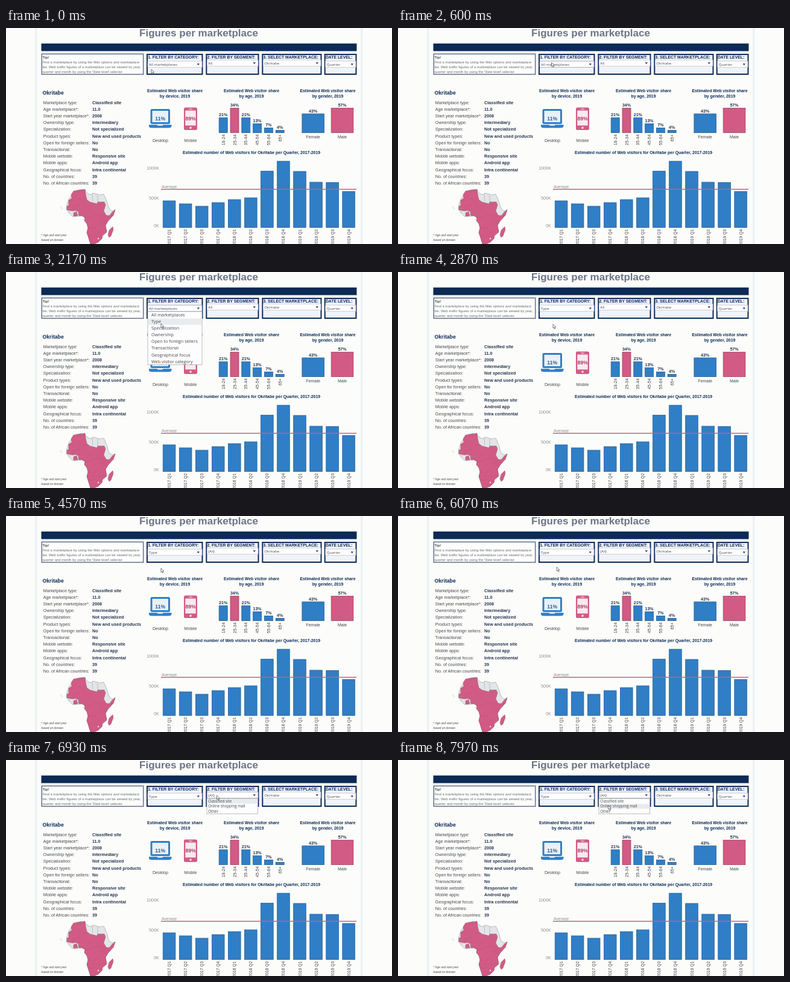
An HTML page that plays this animation: 640x360 px, repeating every 8000 ms.

```html
<!DOCTYPE html>
<html lang="en">
<head>
<meta charset="utf-8">
<title>Figures per marketplace</title>
<style>
  html, body { margin: 0; width: 100%; height: 100%; overflow: hidden; background: #fcfdfa; }
  svg { display: block; width: 100vw; height: 100vh; font-family: "Liberation Sans", Arial, sans-serif; }
  .control { font-family: "Open Sans", "Noto Sans", sans-serif; }
</style>
</head>
<body>
<svg id="stage" viewBox="0 0 640 360"></svg>
<script>
const LOOP = 8000;
const NAVY = '#0b2a55', BLUE = '#307ec6', PINK = '#d15b84', GREY = '#8b8d92', INK = '#45474e';
const NAME = 'Okritabe';
const stage = document.getElementById('stage');
let parent = stage;

function add(tag, attrs) {
  const node = document.createElementNS('http://www.w3.org/2000/svg', tag);
  for (const key in attrs) node.setAttribute(key, attrs[key]);
  return parent.appendChild(node);
}
function rect(x, y, width, height, fill, extra) {
  return add('rect', { x, y, width, height, fill, ...extra });
}
function frame(x, y, width, height, stroke, line, fill = 'none') {
  return rect(x, y, width, height, fill, { stroke, 'stroke-width': line });
}
function text(string, x, y, size, fill, extra) {
  const node = add('text', { x, y, 'font-size': size, fill, ...extra });
  node.textContent = string;
  return node;
}
function bold(string, x, y, size, fill = NAVY, anchor = 'start') {
  return text(string, x, y, size, fill, { 'font-weight': 700, 'text-anchor': anchor });
}
function centered(string, x, y, size, fill = INK) {
  return text(string, x, y, size, fill, { 'text-anchor': 'middle' });
}
function vertical(string, x, y, size) {
  text(string, 0, 0, size, INK, { 'text-anchor': 'end', transform: `translate(${x} ${y}) rotate(-90)` });
}
function path(d, fill, stroke = 'none', line = 0.6) {
  return add('path', { d, fill, stroke, 'stroke-width': line, 'stroke-linejoin': 'round' });
}
function bar(x, top, width, base, fill = BLUE) {
  frame(x, top, width, base - top, fill === BLUE ? '#285f96' : '#9c4565', 0.8, fill);
}
function group() {
  parent = stage;
  return parent = add('g', {});
}

function drawHeader() {
  rect(48, 0, 3.5, 360, '#edf0f6');
  rect(588, 0, 3.5, 360, '#edf0f6');
  bold('Figures per marketplace', 319.5, 14.3, 17.05, '#6c7487', 'middle');
  rect(58.5, 25.8, 523, 12.7, NAVY);
  frame(59.3, 43.3, 168.4, 34, '#63708b', 1.5, '#fdfefc');
  bold('Tip!', 60.5, 51.2, 5.9, INK);
  ['Find a marketplace by using the filter options and marketplace',
   'list. Web traffic figures of a marketplace can be viewed by year,',
   'quarter and month by using the \'Date level\' selector']
    .forEach((line, i) => text(line, 60.5, 59.4 + i * 7.6, 5.85, '#666970'));
}

// Draws one filter panel and returns its value and select box.
function filter(label, x, right, selectY, value) {
  frame(x + 1, 44, right - x - 2, 33, NAVY, 2, '#f0f3f8');
  bold(label, x + 2.2, 51.2, 6.85);
  const box = frame(x + 2, selectY, right - x - 3.5, 10.3, '#c3c6cb', 0.8, '#fff');
  path(`M${right - 10} ${selectY + 4}h4.6l-2.3 3.2z`, '#3e4f70');
  return { box, value: text(value, x + 4, selectY + 7.6, 6.15, INK, { class: 'control' }) };
}

function drawDetails() {
  bold(NAME, 60.5, 110.5, 8.7);
  [['Marketplace type:', 'Classified site'], ['Age marketplace*:', '11.0'],
   ['Start year marketplace*:', '2008'], ['Ownership type:', 'Intermediary'],
   ['Specialization:', 'Not specialized'], ['Product types:', 'New and used products'],
   ['Open for foreign sellers:', 'No'], ['Transactional:', 'No'],
   ['Mobile website:', 'Responsive site'], ['Mobile apps:', 'Android app'],
   ['Geographical focus:', 'Intra continental'], ['No. of countries:', '39'],
   ['No. of African countries:', '39']].forEach(([label, value], i) => {
    const y = 126.6 + i * 11.2;
    text(label, 61.8, y, 7.2, INK);
    bold(value, 143, y, 7.2, '#26334f');
  });
  ['* Age and start year', 'based on domain'].forEach((line, i) =>
    text(line, 58.5, 347.4 + i * 8, 4.75, INK, { 'font-style': 'italic' }));
}

function drawMap() {
  const edge = '#96979f', border = '#86566a';
  path('M112 272L121 270L131 269L133 274L140 278L145 275L155 278L162 277L164 281L168 291L170 299L175 305L181 303L178 312L169 322L165 329L167 340L160 346L159 351L153 357L146 360L140 360L137 350L134 341L136 333L134 326L130 321L131 316L126 313L118 314L110 314L105 309L100 302L101 294L104 285L109 278Z', '#e4e5e8', edge);
  path('M112 272L121 270L131 269L132 277L134 286L139 290L151 293L152 290L163 290L165 295L162 305L166 312L171 313L176 307L181 303L178 312L169 322L165 329L167 340L160 346L159 351L153 357L146 360L140 360L137 350L134 341L136 333L134 326L130 321L131 316L126 313L121 313L120 306L115 304L111 305L105 304L101 303L101 297L104 296L104 287L109 284L108 278Z', PINK, border, 0.5);
  path('M112 314L112 308L117 306L119 313Z', PINK, border, 0.4);
  path('M177 331L178 336L174 347L171 349L169 345L171 337Z', PINK, border, 0.4);
  path('M143 276L144 289M152 278V290M163 290L152 290M102 300L109 301M104 308L108 304M120 306L119 313', 'none', edge, 0.5);
  path('M111 305L112 297L122 296M119 282L133 294M104 287L112 287M133 303L140 304L141 309M165 312L162 319L166 326M131 316L141 315L146 311L161 312L158 326L165 331M136 333L147 334L153 327M138 347L146 347L153 341L160 339', 'none', '#b84d74', 0.35);
  add('circle', { cx: 153, cy: 351, r: 1.2, fill: '#e4e5e8' });
  path('M90 298l2 1M92 301l1.5-.5', 'none', edge);
}

function drawTitle(x, topic) {
  bold('Estimated Web visitor share', x, 107.3, 6.9, NAVY, 'middle');
  bold(`by ${topic}, 2019`, x, 116, 6.9, NAVY, 'middle');
}

function drawDevices() {
  drawTitle(280, 'device');
  rect(239.5, 135, 32.5, 25, BLUE, { rx: 2.5 });
  rect(242.5, 138, 26.5, 19, '#e9f1f8');
  path('M237 161.2H274.5V163.5Q274 166.5 270 166.5H241.5Q237 166.5 237 163.5Z', BLUE);
  rect(251, 161.2, 9, 1.6, '#e9f1f8');
  rect(295, 132.5, 22, 37.5, PINK, { rx: 2.5 });
  rect(297.3, 137.5, 17.4, 25, '#f8eaf0');
  rect(303, 134.6, 6, 1, '#f8eaf0');
  add('circle', { cx: 306, cy: 166.3, r: 1.7, fill: '#f8eaf0' });
  bold('11%', 255.7, 154.3, 8.6, '#285f9e', 'middle');
  bold('89%', 306, 154.3, 8.6, '#a34464', 'middle');
  centered('Desktop', 256, 190, 7.1);
  centered('Mobile', 306, 190, 7.1);
}

function drawShares() {
  drawTitle(407, 'age');
  [['18-24', 21, 149.5], ['25-34', 34, 133.5], ['35-44', 21, 149.5],
   ['45-54', 13, 159.5], ['55-64', 7, 166.5], ['65+', 4, 170.5]].forEach(([age, share, top], i) => {
    const x = 353.2 + i * 18.8;
    bar(x, top, 14, 174.5, share === 34 ? PINK : BLUE);
    bold(share + '%', x + 7, top - 2.4, 7.1, '#26334f', 'middle');
    vertical(age, x + 9.5, 177.3, 7.1);
  });
  drawTitle(533.5, 'gender');
  [['Female', 43, 143, BLUE], ['Male', 57, 133.5, PINK]].forEach(([sex, share, top, fill], i) => {
    const x = 490.9 + i * 48.3;
    bar(x, top, 36.7, 174.5, fill);
    bold(share + '%', x + 18.3, top - 2.4, 7.1, '#26334f', 'middle');
    centered(sex, x + 18.3, 183.5, 7);
  });
}

function drawQuarters() {
  bold(`Estimated number of Web visitors for ${NAME} per Quarter, 2017-2019`, 407, 210.3, 6.9, NAVY, 'middle');
  [['1000K', 236.2], ['500K', 286.2], ['0K', 331.5]].forEach(([label, y]) =>
    text(label, 253.7, y, 7.2, GREY, { 'text-anchor': 'end' }));
  [288, 293, 297, 291, 286, 283, 238.5, 222, 239, 257, 257.5, 272.5].forEach((top, i) => {
    const x = 260.3 + i * 27.05;
    bar(x, top, 20.6, 332.5);
    vertical(`${2017 + Math.floor(i / 4)} Q${i % 4 + 1}`, x + 12.8, 335.5, 6.9);
  });
  rect(257, 268, 324, 1.5, PINK);
  text('Average', 258, 266.8, 6.8, GREY);
}

// An open list with a highlight bar that can be moved between rows.
function list(items, x, y, width, row, indent, size) {
  const node = group();
  frame(x, y, width, items.length * row, '#a9acb3', 0.8, '#fdfdfd');
  const highlight = rect(x + 0.8, y + 0.5, width - 1.6, row - 0.5, '#e9ebee');
  items.forEach((item, i) =>
    text(item, x + indent, y + (i + 0.5) * row + size * 0.37, size, INK, { class: 'control' }));
  return {
    show: on => node.setAttribute('visibility', on ? 'visible' : 'hidden'),
    select: i => highlight.setAttribute('y', y + 0.5 + i * row)
  };
}

drawHeader();
const category = filter('1. FILTER BY CATEGORY:', 233, 326.5, 55.2, 'All marketplaces');
const segment = filter('2. FILTER BY SEGMENT:', 331.3, 419.5, 53.2, 'All');
filter('3. SELECT MARKETPLACE:', 424.3, 523.5, 53.2, NAME);
filter('DATE LEVEL:', 527.7, 581.5, 55.2, 'Quarter');
drawDetails();
drawMap();
drawDevices();
drawShares();
drawQuarters();
const categoryList = list(['All marketplaces', 'Type', 'Specialization', 'Ownership',
  'Open to foreign sellers', 'Transactional', 'Geographical focus', 'Web visitor category'],
  235, 66, 90, 11.05, 6, 7.25);
const segmentList = list(['Classified site', 'Online shopping mall', 'Other'], 333, 64.3, 84.5, 8.5, 2.2, 6.2);
const cursor = group();
path('M0 0V6.6L1.6 5.2L2.8 7.8L3.9 7.3L2.8 4.8H4.8Z', '#fff', '#41444c', 0.7);

// Pointer stops: time, x, y
const route = [[0, 241, 69], [400, 241, 69], [600, 254.5, 57.5], [1740, 254.5, 57.5], [2170, 257, 86],
  [2870, 257, 87], [6035, 257, 87], [6070, 263, 85], [6600, 349.5, 59], [7240, 349.5, 59],
  [7430, 349, 70.5], [7640, 349, 70.5], [7970, 348.7, 76], [LOOP, 348.7, 76]];

function pointerAt(t) {
  const i = route.findIndex(stop => stop[0] > t);
  const [t0, x0, y0] = route[i - 1], [t1, x1, y1] = route[i];
  const k = (t - t0) / (t1 - t0);
  return [x0 + (x1 - x0) * k, y0 + (y1 - y0) * k];
}

function render(t) {
  const [x, y] = pointerAt(t);
  cursor.setAttribute('transform', `translate(${x} ${y})`);
  category.value.textContent = t < 2700 ? 'All marketplaces' : 'Type';
  segment.value.textContent = t < 4570 ? 'All' : '(All)';
  category.box.setAttribute('stroke', t >= 500 && t < 2700 ? '#9da2ab' : '#c3c6cb');
  segment.box.setAttribute('stroke', t >= 6500 ? '#9da2ab' : '#c3c6cb');
  categoryList.show(t >= 1230 && t < 2700);
  categoryList.select(y < 77 ? 0 : 1);
  segmentList.show(t >= 6930);
  segmentList.select(y < 73 ? 0 : 1);
}

function tick() {
  render(performance.now() % LOOP);
  requestAnimationFrame(tick);
}
tick();
</script>
</body>
</html>
```
